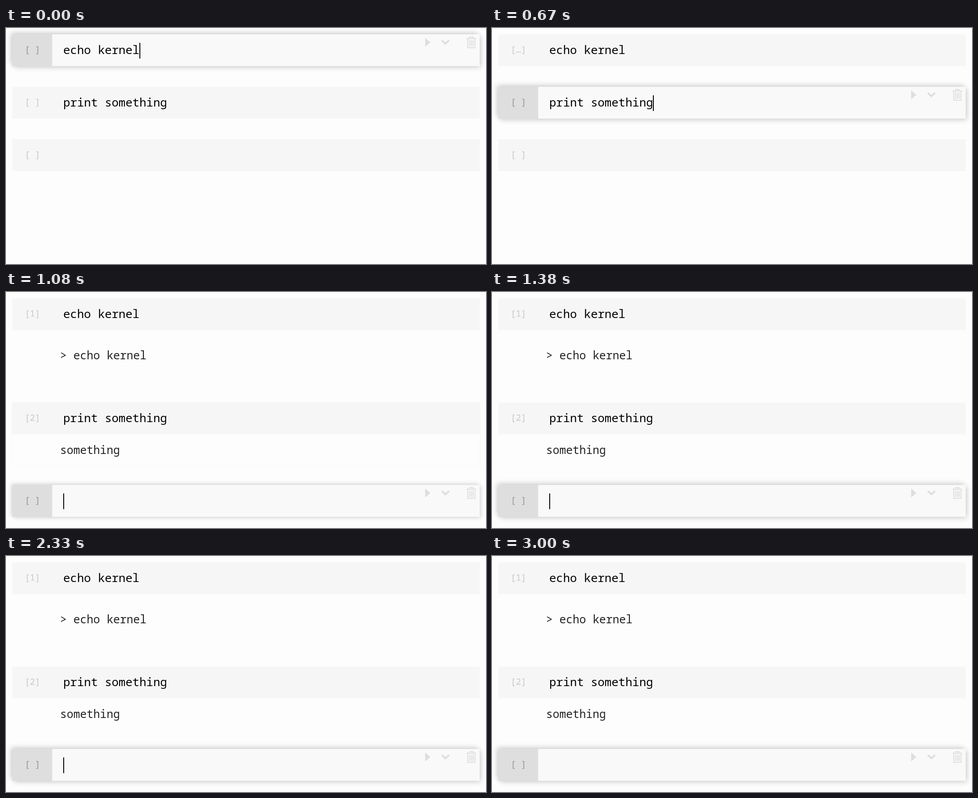
Recreate the animation shown at these times as an HTML page with a canvas. Size 1065 px wide and 526 px high, loop 3040 ms.

```html
<!DOCTYPE html>
<html lang="en">
<head>
<meta charset="utf-8">
<title>Notebook cells</title>
<style>
  html, body { margin: 0; width: 100%; height: 100%; overflow: hidden; background: #fdfdfd; }
  canvas { display: block; }
</style>
</head>
<body>
<canvas id="stage" width="1065" height="526"></canvas>
<script>
const ctx = document.getElementById('stage').getContext('2d');
const LOOP = 3040, FADE = 100, BLINK = 530;
const LEFT = 14, WIDTH = 1037, HEIGHT = 71, PROMPT = 88.5;
const CODE_X = 127, CODE_SIZE = 25.6, ADVANCE = 0.6;
const PAGE = '#fdfdfd', ICON = '#dedee0';

// Times in ms: focus gained, focus lost, result shown.
const cells = [
  { code: 'echo kernel', output: '> echo kernel', outputBaseline: 136, outputHeight: 115,
    focus: -1000, blur: 550, done: 1000, blinks: false },
  { code: 'print something', output: 'something', outputBaseline: 115, outputHeight: 69,
    focus: 550, blur: 1010, done: 1080, blinks: true },
  { code: '', focus: 1010, blur: Infinity, done: Infinity, blinks: true }
];

const clamp = v => Math.max(0, Math.min(1, v));
const ease = v => v * v * (3 - 2 * v);

function rect(x, y, w, h, color) {
  ctx.fillStyle = color;
  ctx.fillRect(x, y, w, h);
}

function text(string, x, y, size, color, weight = 400) {
  ctx.font = `${weight} ${size}px "Noto Sans Mono", "DejaVu Sans Mono", monospace`;
  ctx.fillStyle = color;
  ctx.fillText(string, x, y);
}

function shadow(y, h, amount) {
  ctx.save();
  ctx.shadowColor = `rgba(0, 0, 20, ${0.16 * amount})`;
  ctx.shadowBlur = 11.5 * amount;
  for (const side of [-1, 1]) {
    ctx.shadowOffsetX = ctx.shadowOffsetY = side * 3.8 * amount;
    rect(LEFT, y, WIDTH, h, PAGE);
  }
  ctx.restore();
}

function icons(y) {
  ctx.save();
  ctx.translate(0, y);
  ctx.fillStyle = ctx.strokeStyle = ICON;
  ctx.fill(new Path2D('M930 8 L941.5 18 L930 28 Z'));
  ctx.lineWidth = 4;
  ctx.stroke(new Path2D('M967 13.5 L975 21 L983 13.5'));
  ctx.lineWidth = 2;
  ctx.stroke(new Path2D(
    'M1022 9.5 H1043 M1028.5 9 V6 H1036.5 V9 M1024.5 10 V30 H1040.5 V10 ' +
    'M1028.7 13 V27 M1032.5 13 V27 M1036.3 13 V27'));
  ctx.restore();
}

function drawCell(cell, index, y, t) {
  const focused = t >= cell.focus && t < cell.blur;
  const done = t >= cell.done;
  const glow = ease(clamp((t - cell.focus) / FADE)) * (1 - ease(clamp((t - cell.blur) / FADE)));
  const mark = done ? index + 1 : t >= cell.blur ? '…' : ' ';

  if (glow > 0) shadow(y, HEIGHT + (done ? cell.outputHeight : 0), glow);
  rect(LEFT, y, WIDTH, HEIGHT, glow > 0.4 ? '#f9f9f9' : '#f6f6f6');
  if (focused) {
    rect(LEFT, y, PROMPT, HEIGHT, '#dedede');
    icons(y);
  }
  text(`[${mark}]`, 41.5, y + 41, 19.2, focused ? '#959595' : '#c8c8c8', 300);
  text(cell.code, CODE_X, y + 44, CODE_SIZE, '#000');
  if (done) text(cell.output, 120, y + cell.outputBaseline, 24.6, '#222');

  const caretOn = !cell.blinks || Math.floor((t - cell.focus) / BLINK) % 2 === 0;
  const caretX = Math.round(CODE_X + cell.code.length * CODE_SIZE * ADVANCE);
  if (focused && caretOn) rect(caretX, y + 19, 2, 35, '#000');
}

function draw(now) {
  const t = now % LOOP;
  rect(0, 0, 1065, 526, PAGE);
  const second = t < cells[0].done ? 131 : 246;
  const third = second + (t < cells[1].done ? 117 : 184);
  [14, second, third].forEach((y, i) => drawCell(cells[i], i, y, t));
  requestAnimationFrame(draw);
}
requestAnimationFrame(draw);
</script>
</body>
</html>
```
